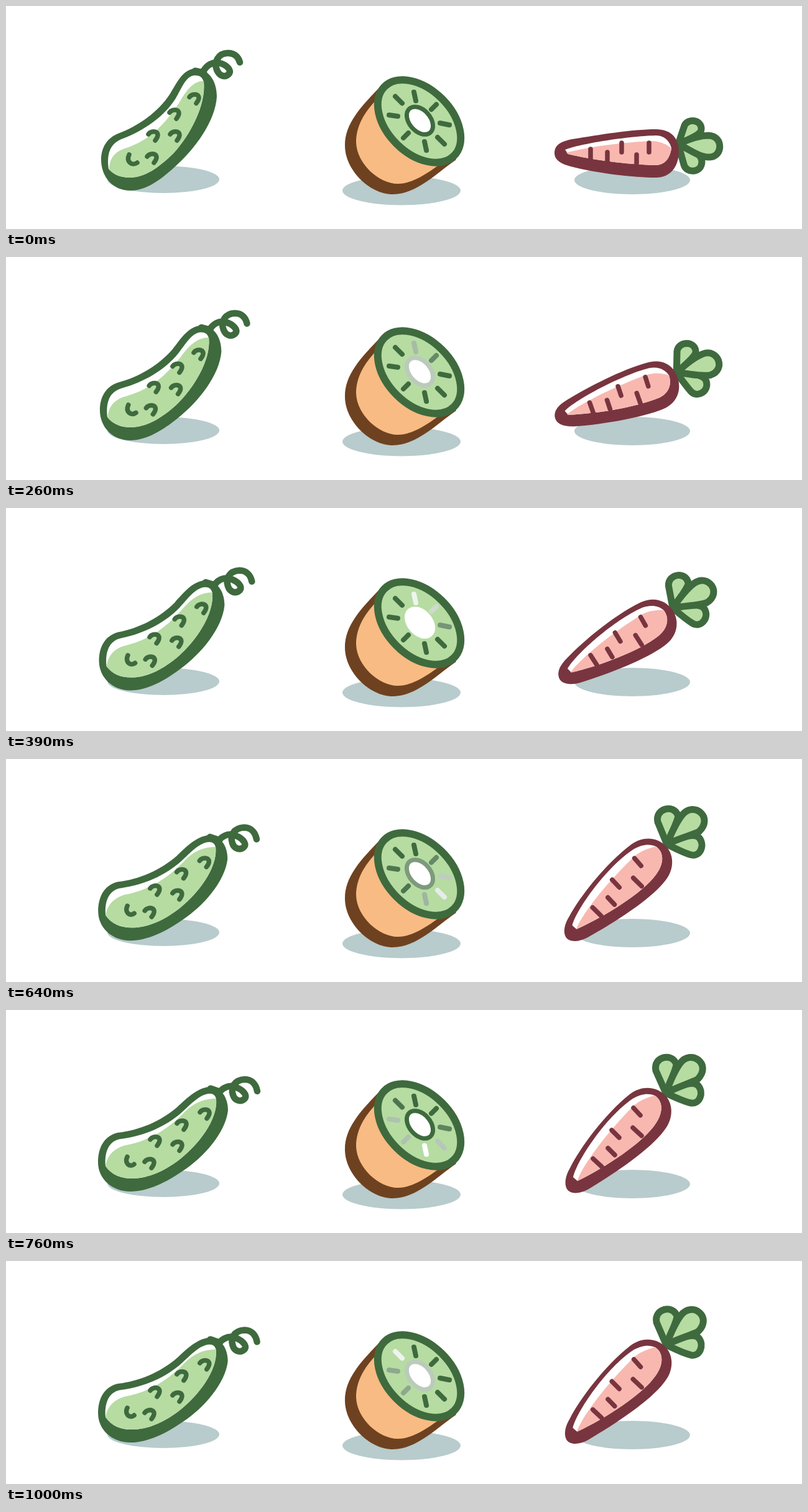
Animation, 1280 px wide and 360 px high, one loop 1.04 s. Source, as an HTML page with a canvas:

```html
<!DOCTYPE html>
<html lang="en">
<head>
<meta charset="utf-8">
<title>Vegetables</title>
<style>
html, body { margin: 0; height: 100%; overflow: hidden; background: #fff; }
canvas { display: block; }
</style>
</head>
<body>
<canvas id="stage" width="1280" height="360"></canvas>
<script>
const ctx = document.getElementById('stage').getContext('2d');
const LOOP = 1040;
const GREEN = '#3e6a3e', LIGHT = '#b6dca2', SHADOW = '#b8cbcd', MAROON = '#78353f',
      PINK = '#f8b8b0', BROWN = '#6e4220', ORANGE = '#f8bb83';

// Start time of each step and how far the lean has gone.
const STEPS = [[0, 0], [130, .09], [260, .41], [390, .69], [520, .87], [600, .935], [640, .96],
  [720, .99], [760, 1], [840, 1.008], [880, 1.008], [960, .995], [1000, .985]];

const bump = (x, y) => `M${x} ${y}C${x + 5} ${y - 8} ${x + 23} ${y - 5} ${x + 11} ${y + 10}`;

// Every part is a pair of paths: resting pose and leaning pose.
const cucumber = {
  outer: ['M153 248C153 228 163 213 180 206C215 193 245 170 263 143C275 124 283 103 304 101C325 101 339 120 339 146C337 185 305 230 270 261C248 281 225 298 200 298C172 298 153 276 153 248Z',
          'M148 246C148 222 158 203 180 198C215 194 248 180 275 157C290 143 307 126 327 124C346 124 357 141 357 162C353 198 318 238 284 260C258 278 228 293 200 293C170 293 148 272 148 246Z'],
  shine: ['M165 263C162 240 166 222 188 214C222 201 255 178 273 149C282 134 289 113 303 112C312 112 316 115 318 123C322 160 295 210 270 237C245 262 222 277 199 277C184 277 173 272 165 263Z',
          'M160 252C158 228 166 210 186 208C222 203 256 189 283 165C297 152 313 135 328 135C333 135 337 138 338 144C341 178 308 218 282 239C257 259 230 272 202 272C184 272 170 266 160 252Z'],
  flesh: ['M166 264C166 245 176 234 194 229C232 216 255 191 278 157C289 138 300 121 318 121C322 160 295 210 270 237C245 262 222 277 199 277C184 277 173 272 166 264Z',
          'M160 252C162 236 174 222 194 218C232 211 263 190 288 164C303 149 319 143 338 143C341 178 308 218 282 239C257 259 230 272 202 272C184 272 170 266 160 252Z'],
  nub: ['M304 105L318 108', 'M329 127L343 132'],
  tendril: ['M317 106C322 96 333 89 343 92C355 95 364 104 358 110C352 116 343 113 339 103C334 91 341 76 357 76C368 76 374 83 376 91',
            'M343 133C348 126 358 121 367 124C379 127 389 137 384 143C378 149 368 147 365 137C361 125 367 113 384 112C395 112 402 120 404 131'],
  bumps: [
    [bump(295, 147), bump(312, 165)], [bump(263, 172), bump(275, 183)],
    [bump(229, 207), bump(232, 209)], [bump(264, 207), bump(268, 217)],
    [bump(227, 243), bump(223, 245)],
    ['M198 240C193 251 202 259 211 253', 'M195 237C190 247 199 255 206 249']
  ]
};

const carrot = {
  outer: ['M882 238C882 224 892 219 910 215C955 208 1005 199 1045 199C1070 199 1082 214 1082 234C1082 260 1068 277 1045 277C1010 277 950 270 908 259C892 255 882 248 882 238Z',
          'M902 289C897 280 900 267 907 255C923 223 961 170 1003 136C1023 121 1044 124 1057 135C1074 149 1074 176 1058 195C1036 225 980 263 937 289C921 298 907 297 902 289Z'],
  shine: ['M899 232C920 223 1000 210 1045 209C1060 209 1068 220 1070 230C1067 248 1058 257 1044 257C1000 256 940 248 904 239Z',
          'M912 270C918 243 965 172 1008 143C1022 135 1033 134 1043 138C1056 146 1058 164 1045 183C1025 214 964 254 919 276Z'],
  flesh: ['M901 237C930 228 1000 219 1040 218C1055 219 1063 224 1070 230C1067 248 1058 257 1044 257C1000 256 940 248 904 239Z',
          'M919 275C929 246 975 188 1011 153C1021 145 1032 141 1043 138C1056 146 1058 164 1045 183C1025 214 964 254 919 276Z'],
  ticks: ['M940 231L940 249M967 236L967 251M990 221L990 236M1014 240L1014 257M1034 221L1034 236',
          'M944 240L958 253M968 223L979 234M974 194L986 206M1008 190L1022 203M1009 158L1020 170'],
  leaves: [
    ['M1081 223L1091 193C1096 181 1119 183 1118 199C1118 208 1100 214 1081 223Z',
     'M1061 134L1045 98C1040 75 1072 68 1078 88C1077 97 1068 116 1061 134Z'],
    ['M1081 223C1098 230 1119 238 1119 251C1119 270 1094 271 1090 256C1087 245 1084 234 1081 223Z',
     'M1061 134C1080 124 1104 113 1113 122C1123 134 1115 153 1101 150C1088 147 1074 140 1061 134Z'],
    ['M1081 223C1100 214 1116 209 1130 209C1154 210 1153 244 1131 244C1114 244 1100 232 1081 223Z',
     'M1061 134C1068 115 1076 97 1084 86C1102 62 1136 88 1112 112C1098 119 1080 124 1061 134Z']
  ]
};

// Kiwi seeds: line ends, then the moment each one is brightest.
const SEEDS = [
  [656, 139, 659, 153, 370], [692, 159, 684, 167, 450], [698, 189, 713, 192, 560],
  [694, 212, 705, 223, 670], [673, 219, 676, 233, 760], [647, 205, 639, 213, 860],
  [616, 176, 630, 178, 860], [626, 146, 637, 157, 980]
];

const lerp = (a, b, k) => a + (b - a) * k;
const rotate = (x, y, a) => [x * Math.cos(a) - y * Math.sin(a), x * Math.sin(a) + y * Math.cos(a)];
const peak = (t, at, width) => Math.max(0, 1 - Math.abs(t - at) / width);

// Blends two poses while turning counter-clockwise about a moving centre.
function morph([from, to], k, turn = 0) {
  const end = to.match(/[\d.]+/g).map(Number);
  let i = 0;
  return new Path2D(from.replace(/([\d.]+) ([\d.]+)/g, (_, x, y) => {
    const p = rotate(x - 982, y - 236, -turn * k);
    const q = rotate(end[i++] - 979, end[i++] - 213, turn * (1 - k));
    return (lerp(982, 979, k) + lerp(p[0], q[0], k)).toFixed(2) + ' ' +
           (lerp(236, 213, k) + lerp(p[1], q[1], k)).toFixed(2);
  }));
}

function fill(path, color) {
  ctx.fillStyle = color;
  ctx.fill(path);
}

function stroke(path, color, width) {
  ctx.strokeStyle = color;
  ctx.lineWidth = width;
  ctx.stroke(path);
}

function ellipse(x, y, rx, ry, angle = 0) {
  const path = new Path2D();
  path.ellipse(x, y, rx, ry, angle, 0, 2 * Math.PI);
  return path;
}

// Dark green brightened towards white.
const glow = w => `rgb(${[62, 106, 62].map(c => Math.round(lerp(c, 255, w)))})`;

function drawCucumber(k) {
  const part = pair => morph(pair, k);
  fill(ellipse(253, 280, 90, 22), SHADOW);
  stroke(part(cucumber.tendril), GREEN, 10.5);
  stroke(part(cucumber.nub), GREEN, 11);
  fill(part(cucumber.outer), GREEN);
  fill(part(cucumber.shine), '#fff');
  fill(part(cucumber.flesh), LIGHT);
  for (const b of cucumber.bumps) stroke(part(b), GREEN, 7.5);
}

function drawKiwi(t) {
  fill(ellipse(636, 298, 95, 23.5), SHADOW);
  fill(new Path2D('M603 129C570 163 545 190 545 225C545 265 585 304 622 304C660 304 692 270 724 248Z'), BROWN);
  fill(new Path2D('M595 152C575 173 563 195 563 220C564 255 600 287 630 287C655 287 680 268 697 256Z'), ORANGE);
  const face = ellipse(664.5, 186, 79, 51.5, Math.PI / 4);
  fill(face, LIGHT);
  stroke(face, GREEN, 12);
  for (const [x1, y1, x2, y2, at] of SEEDS)
    stroke(new Path2D(`M${x1} ${y1}L${x2} ${y2}`), glow(peak(t, at, 240)), 8);
  const core = ellipse(665.5, 185, 25.5, 17, .86);
  fill(core, '#fff');
  stroke(core, glow(peak(t, 390, 370) + Math.max(0, (t - 760) / 370)), 7);
}

function drawCarrot(k) {
  const part = pair => morph(pair, k, Math.PI / 4);
  fill(ellipse(1007, 281, 93, 23), SHADOW);
  for (const leaf of carrot.leaves) {
    const path = part(leaf);
    fill(path, LIGHT);
    stroke(path, GREEN, 11);
  }
  fill(part(carrot.outer), MAROON);
  fill(part(carrot.shine), '#fff');
  fill(part(carrot.flesh), PINK);
  stroke(part(carrot.ticks), MAROON, 7.5);
}

function draw(now) {
  const [t, k] = STEPS.findLast(s => s[0] <= now % LOOP);
  ctx.clearRect(0, 0, 1280, 360);
  ctx.lineCap = ctx.lineJoin = 'round';
  drawCucumber(k);
  drawKiwi(t);
  drawCarrot(k);
}

const start = performance.now();
function tick() {
  draw(performance.now() - start);
  requestAnimationFrame(tick);
}
tick();
</script>
</body>
</html>
```
